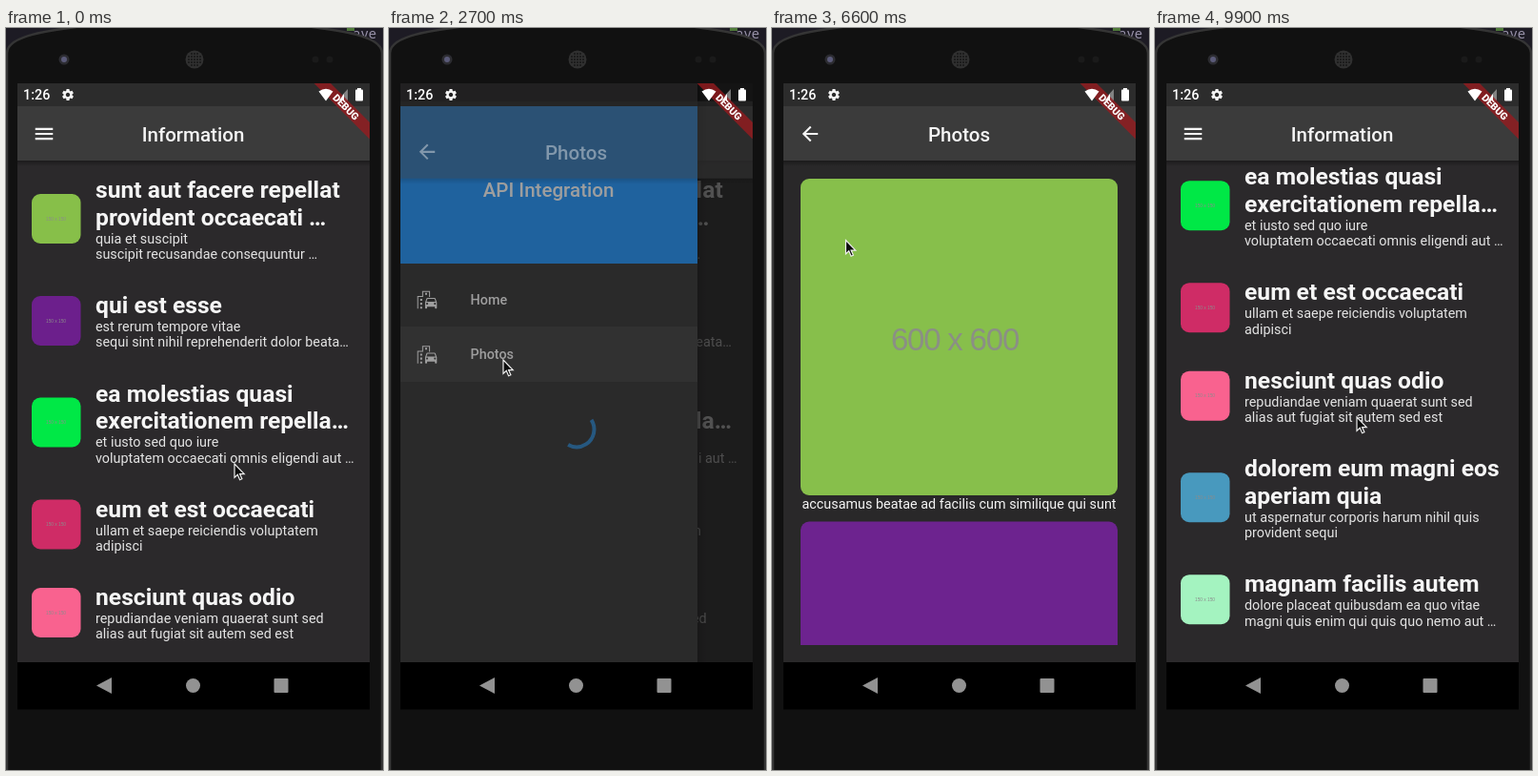
An HTML page with a canvas that plays this animation: 396 by 778 pixels, repeating every 10000 ms.

```html
<!DOCTYPE html>
<html lang="en">
<head>
<meta charset="utf-8">
<title>List and photos app</title>
<style>
html, body { margin: 0; width: 100%; height: 100%; overflow: hidden; background: #111; }
canvas { display: block; }
</style>
</head>
<body>
<canvas id="stage" width="396" height="778"></canvas>
<script>
const c = document.getElementById('stage').getContext('2d');
const LOOP = 10000, STEP = 100;
const LEFT = 12, TOP = 58, RIGHT = 382, BOTTOM = 665, MID = 196.5;
const PAGE = '#2b292b', BAR = '#3b3b3b', WHITE = '#f5f5f5';

const icons = {
  menu: 'M3 18h18v-2H3zM3 13h18v-2H3zM3 6v2h18V6z',
  back: 'M20 11H7.83l5.59-5.59L12 4l-8 8 8 8 1.41-1.41L7.83 13H20z',
  gear: 'M19.14 12.94c.04-.3.06-.61.06-.94 0-.32-.02-.64-.07-.94l2.03-1.58c.18-.14.23-.41.12-.61l-1.92-3.32c-.12-.22-.37-.29-.59-.22l-2.39.96c-.5-.38-1.03-.7-1.62-.94l-.36-2.54c-.04-.24-.24-.41-.48-.41h-3.84c-.24 0-.43.17-.47.41l-.36 2.54c-.59.24-1.13.57-1.62.94l-2.39-.96c-.22-.08-.47 0-.59.22L2.74 8.87c-.12.21-.08.47.12.61l2.03 1.58c-.05.3-.09.63-.09.94s.02.64.07.94l-2.03 1.58c-.18.14-.23.41-.12.61l1.92 3.32c.12.22.37.29.59.22l2.39-.96c.5.38 1.03.7 1.62.94l.36 2.54c.05.24.24.41.48.41h3.84c.24 0 .44-.17.47-.41l.36-2.54c.59-.24 1.13-.56 1.62-.94l2.39.96c.22.08.47 0 .59-.22l1.92-3.32c.12-.22.07-.47-.12-.61zM12 15.6c-1.98 0-3.6-1.62-3.6-3.6s1.62-3.6 3.6-3.6 3.6 1.62 3.6 3.6-1.62 3.6-3.6 3.6z',
  city: 'M20.57 10.66C20.43 10.26 20.05 10 19.6 10h-7.19c-.46 0-.83.26-.98.66L10 14.77l.01 5.51c0 .38.31.72.69.72h.62c.38 0 .68-.38.68-.76V19h8v1.24c0 .38.31.76.69.76h.61c.38 0 .69-.34.69-.72l.01-1.37v-4.14zM12.41 11h7.19l1.03 3h-9.25zM12 17a1 1 0 1 1 0-2 1 1 0 0 1 0 2zM20 17a1 1 0 1 1 0-2 1 1 0 0 1 0 2zM14 9h1V3H7v5H2v13h1V9h5V4h6zM5 11h2v2H5zM10 5h2v2h-2zM5 15h2v2H5zM5 19h2v2H5z',
  pointer: 'M0 0V16l3.6-3.4 2.6 6 2.6-1.2-2.6-5.6h5.2z'
};
for (const name in icons) icons[name] = new Path2D(icons[name]);

const rows = [
  ['#87bf49', ['sunt aut facere repellat', 'provident occaecati …'], ['quia et suscipit', 'suscipit recusandae consequuntur …']],
  ['#6c1f8c', ['qui est esse'], ['est rerum tempore vitae', 'sequi sint nihil reprehenderit dolor beata…']],
  ['#00e846', ['ea molestias quasi', 'exercitationem repella…'], ['et iusto sed quo iure', 'voluptatem occaecati omnis eligendi aut …']],
  ['#cf2c66', ['eum et est occaecati'], ['ullam et saepe reiciendis voluptatem', 'adipisci']],
  ['#f9628f', ['nesciunt quas odio'], ['repudiandae veniam quaerat sunt sed', 'alias aut fugiat sit autem sed est']],
  ['#4899be', ['dolorem eum magni eos', 'aperiam quia'], ['ut aspernatur corporis harum nihil quis', 'provident sequi']],
  ['#a4f3c0', ['magnam facilis autem'], ['dolore placeat quibusdam ea quo vitae', 'magni quis enim qui quis quo nemo aut …']],
  ['#54176f', ['dolorem dolore est'], []]
];

// time, x, y of the pointer tip
const route = [
  [0, 240, 457], [200, 240, 457], [900, 36, 109], [1700, 36, 109], [2300, 120, 348],
  [3400, 120, 348], [4000, 114, 345], [6300, 114, 345], [6900, 41, 100], [8200, 41, 100],
  [8800, 38, 104], [8900, 38, 104], [9400, 224, 628], [9900, 212, 408], [10000, 212, 408]
];

const clamp = v => Math.min(1, Math.max(0, v));
const span = (t, start, length) => clamp((t - start) / length);
const smooth = v => v * v * (3 - 2 * v);

function bezier(x1, y1, x2, y2) {
  const at = (a, b, s) => 3 * a * s * (1 - s) ** 2 + 3 * b * s * s * (1 - s) + s ** 3;
  return x => {
    let lo = 0, hi = 1;
    for (let i = 0; i < 20; i++) {
      const m = (lo + hi) / 2;
      if (at(x1, x2, m) < x) lo = m; else hi = m;
    }
    return at(y1, y2, lo);
  };
}
const slideCurve = bezier(.4, 0, .2, 1), fadeCurve = bezier(.42, 0, 1, 1);

function rect(x, y, w, h, color, r = 0) {
  c.fillStyle = color;
  c.beginPath();
  c.roundRect(x, y, w, h, r);
  c.fill();
}

function disc(x, y, r, color) {
  c.fillStyle = color;
  c.beginPath();
  c.arc(x, y, r, 0, 7);
  c.fill();
}

function poly(color, ...p) {
  c.fillStyle = color;
  c.beginPath();
  for (let i = 0; i < p.length; i += 2) c.lineTo(p[i], p[i + 1]);
  c.fill();
}

function text(s, x, y, size, weight = 400, color = WHITE, align = 'left', family = 'Roboto, sans-serif') {
  c.font = `${weight} ${size}px ${family}`;
  c.textAlign = align;
  c.fillStyle = color;
  c.fillText(s, x, y);
}

function icon(name, x, y, size) {
  c.save();
  c.translate(x - size / 2, y - size / 2);
  c.scale(size / 24, size / 24);
  c.fillStyle = WHITE;
  c.fill(icons[name], 'evenodd');
  c.restore();
}

function clipped(x, y, w, h, draw) {
  c.save();
  c.beginPath();
  c.rect(x, y, w, h);
  c.clip();
  draw();
  c.restore();
}

function shade(x, y, w, h, dx, dy) {
  const g = c.createLinearGradient(x, y, x + dx, y + dy);
  g.addColorStop(0, 'rgba(0,0,0,.35)');
  g.addColorStop(1, 'rgba(0,0,0,0)');
  rect(x, y, w, h, g);
}

function appBar(title, name) {
  shade(LEFT, 139, 370, 6, 0, 6);
  rect(LEFT, TOP, 370, 81, BAR);
  icon(name, 40, 111, 24.7);
  text(title, MID, 119, 20.56, 500, WHITE, 'center');
}

function listPage(scroll) {
  rect(LEFT, TOP, 370, 607, PAGE);
  let y = 178 - scroll;
  for (const [color, title, lines] of rows) {
    const two = title.length > 1, mid = y + (two ? 22 : 8);
    rect(27, mid - 26, 51.5, 52, color, 9);
    text('150 x 150', 52.5, mid + 1.5, 4.8, 400, '#8c8c8c', 'center', '"Liberation Sans", sans-serif');
    title.forEach((s, i) => text(s, 94, y + i * 28.8, 24.67, 700));
    const base = y + (two ? 47.8 : 19);
    lines.forEach((s, i) => text(s, 94, base + i * 16.4, 14.39, 400, '#e4e4e4'));
    y += two ? 121 : 92.5;
  }
  appBar('Information', 'menu');
}

function drawer(t) {
  const p = smooth(span(t, 1180, 260));
  if (!p || t > 3000) return;
  rect(LEFT, TOP, 370, 607, `rgba(0,0,0,${.54 * p})`);
  c.save();
  c.translate(-312 * (1 - p), 0);
  shade(324, TOP, 10, 607, 10, 0);
  rect(LEFT, TOP, 312, 607, '#2c2b2c');
  rect(LEFT, 82, 312, 165, '#188df6');
  text('API Integration', 167.5, 176.5, 20.56, 500, WHITE, 'center');
  if (t >= 2400) rect(LEFT, 313, 312, 58, 'rgba(255,255,255,.06)');
  ['Home', 'Photos'].forEach((s, i) => {
    icon('city', 40, 285 + i * 57.5, 24.7);
    text(s, 85.5, 289.5 + i * 57.5, 14.39, 500);
  });
  c.restore();
}

function spinner(e) {
  const p = e % 1333 / 1333, turn = 1.5 * Math.PI;
  const head = slideCurve(clamp(p * 2)) * turn;
  const tail = slideCurve(clamp(p * 2 - 1)) * turn;
  const start = -Math.PI / 2 + tail + e / 2222 * 2 * Math.PI + p * Math.PI / 2;
  c.strokeStyle = '#2196f3';
  c.lineWidth = 4;
  c.beginPath();
  c.arc(197, 402, 18.5, start, start + Math.max(head - tail, .02));
  c.stroke();
}

function photosPage(t) {
  rect(LEFT, TOP, 370, 607, '#292829');
  if (t < 4700) spinner(t - 2450);
  else clipped(LEFT, 139, 370, 508, () => {
    rect(30, 158, 333, 332, '#87bf4b', 9);
    c.letterSpacing = '-1.2px';
    text('600 x 600', 192, 338, 33, 400, '#8b8f85', 'center', '"Liberation Sans", sans-serif');
    c.letterSpacing = '0px';
    text('accusamus beatae ad facilis cum similique qui sunt', MID, 504, 14.39, 400, WHITE, 'center');
    rect(30, 517.5, 333, 332, '#6d238f', 9);
  });
  appBar('Photos', 'back');
}

function photosLayer(t) {
  const p = t < 5000 ? span(t, 2520, 300) : 1 - span(t, 8550, 300);
  if (!p) return;
  c.save();
  c.globalAlpha = fadeCurve(p);
  c.translate(0, 152 * (1 - slideCurve(p)));
  // one flat group keeps the fade even over the page beneath
  photosPage(t);
  c.restore();
}

function statusBar() {
  rect(LEFT, TOP, 370, 24, 'rgba(0,0,0,.25)');
  poly('rgba(190,190,190,.6)', 348, 76, 359, 76, 359, 64);
  c.save();
  c.translate(RIGHT, TOP);
  c.rotate(Math.PI / 4);
  rect(-41, 29, 82, 12.3, 'rgba(150,27,30,.8)');
  text('DEBUG', 0, 38.9, 10.5, 900, '#fff', 'center');
  c.restore();
  text('1:26', 18, 75, 14.4, 500, '#fff');
  icon('gear', 65, 70, 15);
  c.fillStyle = '#fff';
  c.beginPath();
  c.moveTo(336, 76.5);
  c.lineTo(328.5, 66.5);
  c.quadraticCurveTo(336, 61, 343.5, 66.5);
  c.fill();
  poly('#fff', 350, 76, 355, 76, 355, 69);
  rect(367, 64.5, 8, 12, '#fff', 1);
  rect(369, 63, 4, 2, '#fff');
}

function phone() {
  rect(0, 0, 396, 778, '#1d1b24');
  rect(358, 0, 8, 3, '#4f7a3a');
  text('ave', 364, 11, 14, 400, '#9a94ab', 'left', '"Noto Sans Mono", monospace');
  c.beginPath();
  c.moveTo(1, 790);
  c.lineTo(1, 26);
  c.bezierCurveTo(2, 8, 40, 3, 95, -4);
  c.lineTo(300, -4);
  c.bezierCurveTo(355, 3, 394, 8, 395, 26);
  c.lineTo(395, 790);
  c.fillStyle = '#111';
  c.fill();
  c.strokeStyle = '#353535';
  c.lineWidth = 2.5;
  c.stroke();
  disc(61, 33, 5.5, '#2c2c31');
  disc(61, 33, 3, '#5a5a78');
  disc(198, 33, 9.5, '#303030');
  for (let y = -6; y <= 6; y += 3)
    for (let x = -6; x <= 6; x += 3)
      if (x * x + y * y < 60) disc(198 + x, 33 + y, .9, '#161616');
  disc(325, 33, 3.5, '#1a1a1a');
  disc(340, 33, 3.5, '#1a1a1a');
}

function navBar() {
  rect(LEFT, BOTTOM, 370, 49.5, '#000');
  poly('#929292', 95, 689.5, 111, 681, 111, 698);
  disc(MID, 689.5, 7.5, '#929292');
  rect(281.5, 682, 15, 15, '#929292', 1);
}

function pointer(t) {
  const i = route.findIndex(k => k[0] > t);
  const [t0, x0, y0] = route[i - 1], [t1, x1, y1] = route[i];
  const p = smooth((t - t0) / (t1 - t0));
  c.save();
  c.translate(x0 + (x1 - x0) * p, y0 + (y1 - y0) * p);
  c.scale(.9, .9);
  c.fillStyle = '#0c0c0c';
  c.strokeStyle = '#f0f0f0';
  c.lineWidth = 1.3;
  c.fill(icons.pointer);
  c.stroke(icons.pointer);
  c.restore();
}

function draw(t) {
  phone();
  clipped(LEFT, TOP, RIGHT - LEFT, BOTTOM - TOP, () => {
    listPage(227.3 * smooth(span(t, 9400, 500)));
    drawer(t);
    photosLayer(t);
    statusBar();
  });
  navBar();
  pointer(t);
}

const begin = performance.now();
function tick() {
  const t = (performance.now() - begin) % LOOP;
  draw(Math.floor(t / STEP) * STEP);
  requestAnimationFrame(tick);
}
tick();
</script>
</body>
</html>
```
